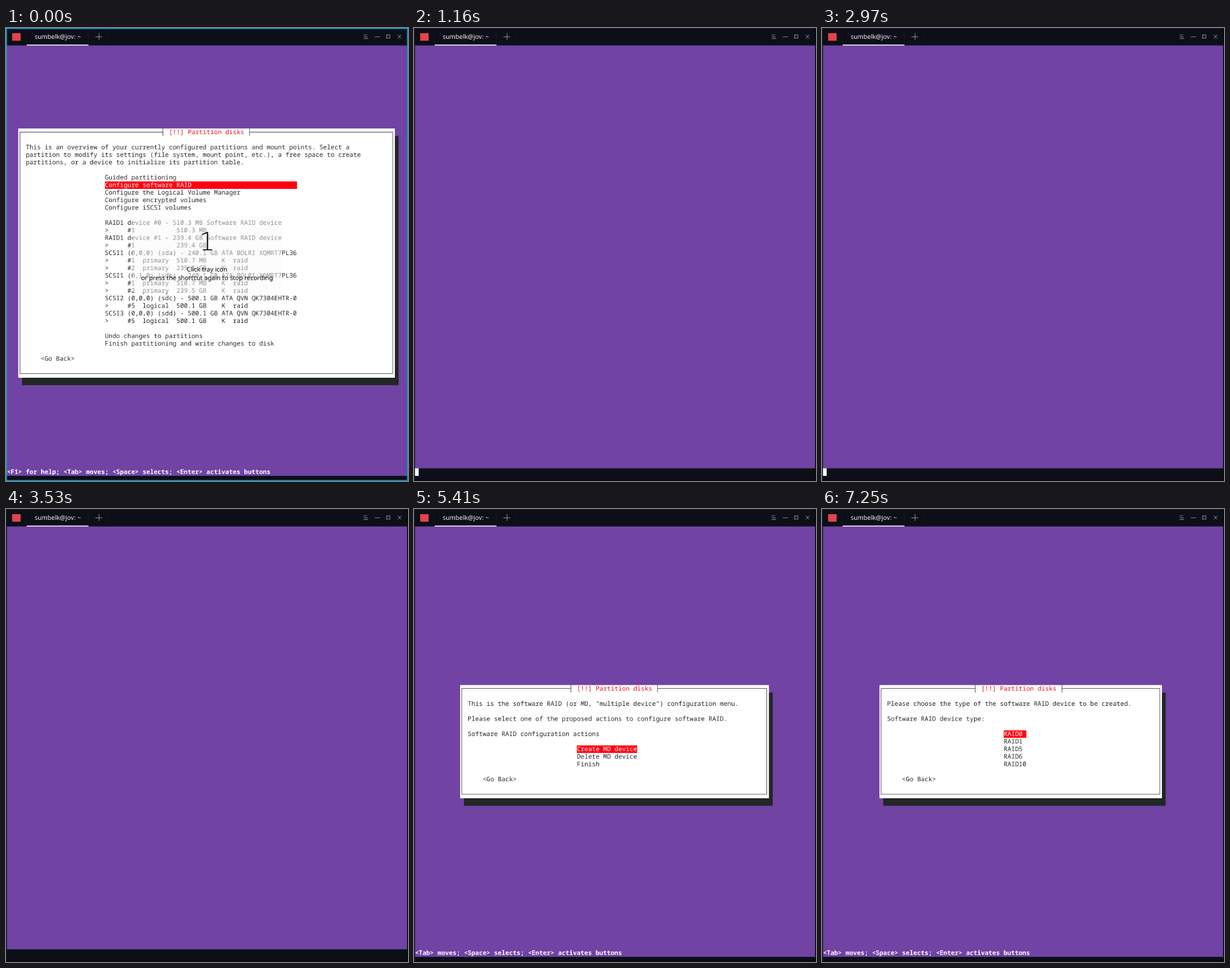
Write an HTML page with a canvas that moves like this. It is 706 px wide and 794 px high and loops after 8000 ms.

```html
<!DOCTYPE html>
<html lang="en">
<head>
<meta charset="utf-8">
<title>Partition disks</title>
<style>
html, body { margin: 0; width: 100%; height: 100%; overflow: hidden; background: #0c0f17; }
canvas { display: block; }
</style>
</head>
<body>
<canvas id="stage" width="706" height="794"></canvas>
<script>
const stage = document.getElementById('stage');
const view = stage.getContext('2d');
const LOOP = 8000;

// The desktop is drawn on whole pixels, then scaled down to the stage
const W = 854, H = 960;
const screen = document.createElement('canvas');
screen.width = W;
screen.height = H;
const ctx = screen.getContext('2d');

// Terminal grid
const X0 = 2, Y0 = 37, CW = 8, CH = 16;
const MONO = '13.3333px "Noto Sans Mono", monospace';
const SANS = '13.3333px "Noto Sans", sans-serif';
const DIGIT = '200 53px "DejaVu Sans Light", "Noto Sans CJK JP", sans-serif';

const DARK = '#0c0f17', PURPLE = '#7043a4', SHADOW = '#222624';
const INK = '#232629', RED = '#ff0010', TITLE_RED = '#ea0718', WHITE = '#ffffff';
const EDGE = '#20242a', FOCUS = '#0b9fd6', GREY = '#b4b6b9';

const colX = c => X0 + c * CW;
const rowY = r => Y0 + r * CH;

function rect(x, y, w, h, color) {
  ctx.fillStyle = color;
  ctx.fillRect(x, y, w, h);
}

function cells(c, r, cols, rows, color) {
  rect(colX(c), rowY(r), cols * CW, rows * CH, color);
}

function label(str, x, y, font, color, align = 'left') {
  ctx.font = font;
  ctx.fillStyle = color;
  ctx.textAlign = align;
  ctx.fillText(str, x, y);
}

function text(c, r, str, color = INK, weight = '') {
  label(str, colX(c), rowY(r) + 12, weight + MONO, color);
}

function option(c, r, str, width, active) {
  if (active) cells(c, r, width, 1, RED);
  text(c, r, str, active ? WHITE : INK);
}

function list(c, r, items, width, active) {
  items.forEach((item, i) => option(c, r + i, item, width, i === active));
}

function dialog(c, r, cols, rows, titleCol) {
  cells(c + 1, r + 1, cols, rows, SHADOW);
  cells(c, r, cols, rows, WHITE);
  const midX = n => colX(n) + 3, midY = n => rowY(n) + 7;
  const left = midX(c), right = midX(c + cols - 1);
  const top = midY(r), bottom = midY(r + rows - 1);
  const tickL = midX(titleCol - 2), tickR = midX(titleCol + 21);
  rect(left, top, tickL - left, 1, INK);
  rect(tickR, top, right - tickR, 1, INK);
  rect(left, bottom, right - left + 1, 1, INK);
  for (const x of [left, right]) rect(x, top, 1, bottom - top, INK);
  for (const x of [tickL, tickR]) rect(x, rowY(r), 1, CH, INK);
  text(titleCol, r, '[!!] Partition disks', TITLE_RED);
}

function status(str) {
  rect(X0, rowY(56), 850, CH, PURPLE);
  text(0, 56, str, WHITE, 'bold ');
}

const SHORT_HELP = '<Tab> moves; <Space> selects; <Enter> activates buttons';

function windowFrame(focused) {
  rect(0, 0, W, H, DARK);
  rect(X0, Y0, 850, 56 * CH, PURPLE);

  // Tab bar
  rect(13, 11, 18, 16, '#e5434e');
  for (const x of [43, 174, 218]) rect(x, 1, 1, 34, '#161a22');
  rect(44, 35, 131, 2, '#f4f4f4');
  label('sumbelk@jov: ~', 61, 23, SANS, '#f4f5f6');
  rect(190, 18, 14, 1, GREY);
  rect(197, 11, 1, 14, GREY);

  // Window buttons
  rect(760, 14, 7, 1, GREY);
  rect(760, 18, 8, 1, GREY);
  rect(760, 22, 9, 1, GREY);
  rect(784, 18, 10, 1, GREY);
  ctx.strokeStyle = GREY;
  ctx.lineWidth = 1;
  ctx.strokeRect(808.5, 14.5, 7, 7);
  ctx.beginPath();
  ctx.moveTo(832, 14);
  ctx.lineTo(840, 22);
  ctx.moveTo(840, 14);
  ctx.lineTo(832, 22);
  ctx.stroke();

  const size = focused ? 2 : 1;
  const near = focused ? FOCUS : EDGE, far = focused ? FOCUS : '#06080d';
  rect(0, 0, W, size, near);
  rect(0, 0, size, H, near);
  rect(W - 2, 0, 2, H, far);
  rect(0, H - 2, W, 2, far);
}

function blank(cursorOn) {
  if (cursorOn) cells(0, 56, 1, 1, WHITE);
}

function overview() {
  dialog(3, 11, 100, 33, 43);
  text(5, 13, 'This is an overview of your currently configured partitions and mount points. Select a');
  text(5, 14, 'partition to modify its settings (file system, mount point, etc.), a free space to create');
  text(5, 15, 'partitions, or a device to initialize its partition table.');
  const array = (n, size) => [
    `RAID1 device #${n} - ${size} Software RAID device`,
    `>     #1           ${size}`
  ];
  const part = (n, kind, size) => `>     #${n}  ${kind}  ${size}    K  raid`;
  const solid = (bus, dev) => [
    `SCSI1 (0,${bus},0) (${dev}) - 240.1 GB ATA BOLRI XQMRT7PL36`,
    part(1, 'primary', '510.7 MB'),
    part(2, 'primary', '239.5 GB')
  ];
  const hard = (n, dev) => [
    `SCSI${n} (0,0,0) (${dev}) - 500.1 GB ATA QVN QK7304EHTR-0`,
    part(5, 'logical', '500.1 GB')
  ];
  list(26, 17, [
    'Guided partitioning',
    'Configure software RAID',
    'Configure the Logical Volume Manager',
    'Configure encrypted volumes',
    'Configure iSCSI volumes',
    '',
    ...array(0, '510.3 MB'),
    ...array(1, '239.4 GB'),
    ...solid(0, 'sda'),
    ...solid(1, 'sdb'),
    ...hard(2, 'sdc'),
    ...hard(3, 'sdd'),
    '',
    'Undo changes to partitions',
    'Finish partitioning and write changes to disk'
  ], 51, 1);
  text(9, 41, '<Go Back>');
  status('<F1> for help; ' + SHORT_HELP);
}

function countdown() {
  ctx.fillStyle = 'rgba(249, 249, 249, 0.5)';
  ctx.beginPath();
  ctx.roundRect(268, 399, 318, 162, 7);
  ctx.fill();
  label('1', W / 2, 471, DIGIT, '#000', 'center');
  label('Click tray icon', W / 2, 516, SANS, '#000', 'center');
  label('or press the shortcut again to stop recording', W / 2, 534, SANS, '#000', 'center');
}

function confirmLayout(yes) {
  dialog(3, 23, 99, 11, 42);
  text(5, 25, 'When RAID is configured, no additional changes to the partitions in the disks containing');
  text(5, 26, 'physical volumes are allowed.  Please convince yourself that you are satisfied with the current');
  text(5, 27, 'partitioning scheme in these disks.');
  text(5, 29, 'Keep current partition layout and configure RAID?');
  option(9, 31, '<Yes>', 5, yes);
  option(92, 31, '<No>', 4, !yes);
  status(SHORT_HELP);
}

function actions(active) {
  dialog(12, 21, 82, 15, 43);
  text(14, 23, 'This is the software RAID (or MD, "multiple device") configuration menu.');
  text(14, 25, 'Please select one of the proposed actions to configure software RAID.');
  text(14, 27, 'Software RAID configuration actions');
  list(43, 29, ['Create MD device', 'Delete MD device', 'Finish'], 16, active);
  text(18, 33, '<Go Back>');
  status(SHORT_HELP);
}

function raidType(active) {
  dialog(15, 21, 75, 15, 42);
  text(17, 23, 'Please choose the type of the software RAID device to be created.');
  text(17, 25, 'Software RAID device type:');
  list(48, 27, ['RAID0', 'RAID1', 'RAID5', 'RAID6', 'RAID10'], 6, active);
  text(21, 33, '<Go Back>');
  status(SHORT_HELP);
}

// Each scene holds from its start time until the next one
const scenes = [
  [0, () => { overview(); countdown(); }],
  [50, overview],
  [1160, () => blank(true)],
  [1210, () => confirmLayout(false)],
  [2080, () => confirmLayout(true)],
  [2970, () => blank(true)],
  [3530, () => blank(false)],
  [4030, () => actions(2)],
  [5090, () => actions(1)],
  [5410, () => actions(0)],
  [6190, () => raidType(1)],
  [7250, () => raidType(0)]
];

function draw(t) {
  windowFrame(t < scenes[1][0]);
  scenes.filter(([start]) => start <= t).pop()[1]();
  view.drawImage(screen, 0, 0, stage.width, stage.height);
}

ctx.textRendering = 'geometricPrecision';
const begin = performance.now();
function tick() {
  draw((performance.now() - begin) % LOOP);
  requestAnimationFrame(tick);
}
tick();
</script>
</body>
</html>
```
